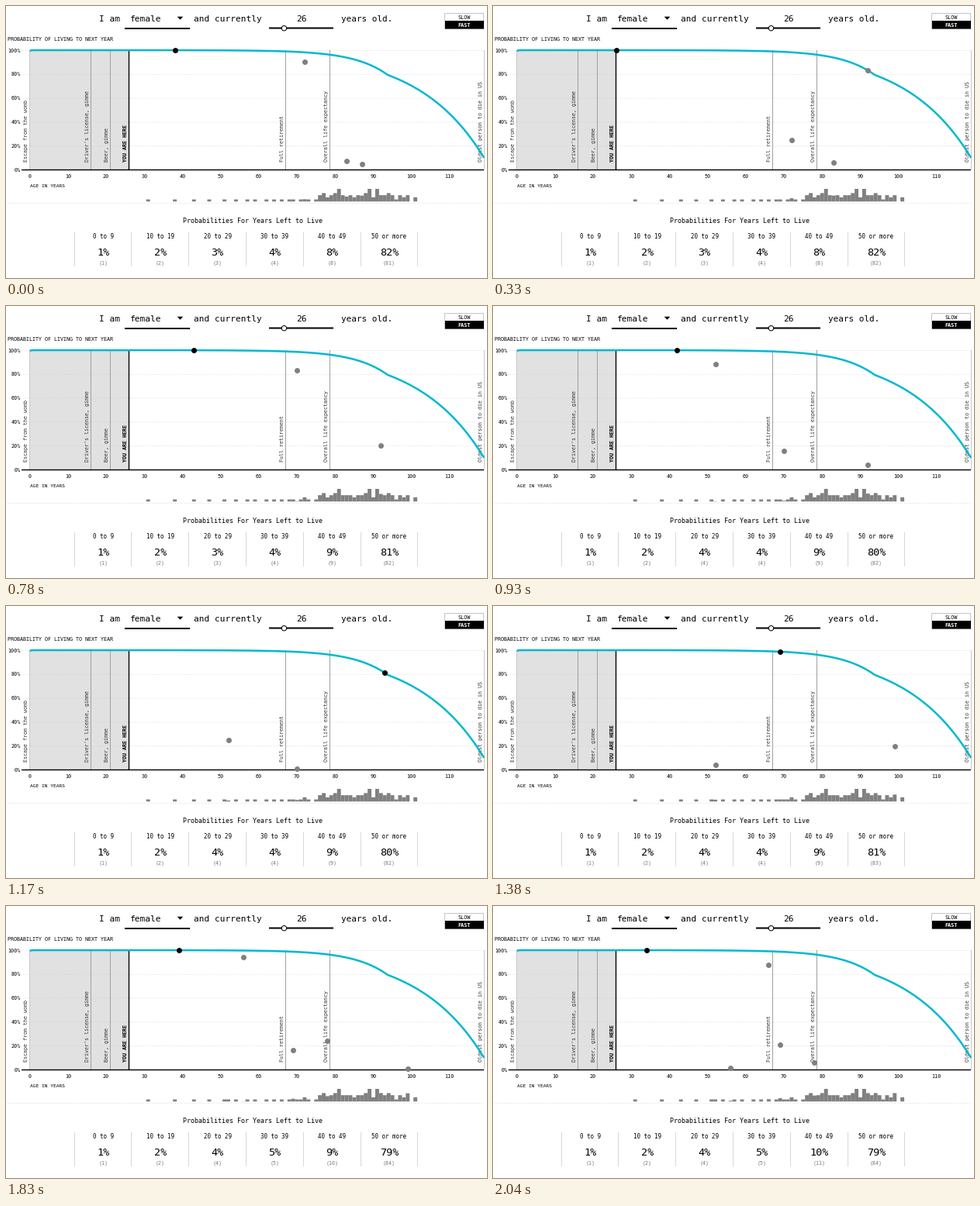
Animation of 620x351 px, one loop 2070 ms. Source, as a matplotlib script:

```python
import numpy as np
import matplotlib
import matplotlib.pyplot as plt
from matplotlib.animation import FuncAnimation
from matplotlib.patches import Circle, Polygon, Rectangle

matplotlib.rcParams["toolbar"] = "None"
matplotlib.rcParams["font.family"] = "DejaVu Sans Mono"
matplotlib.rcParams["path.snap"] = False

W, H, DPI = 620, 351, 100
FRAMES, STEP = 69, 30
PT = 72 / DPI
TOP, FLOOR = 57, 211
START, OLDEST = 26, 119
BLACK, GREY, CYAN = "#000000", "#808080", "#00b8cf"

fig = plt.figure(figsize=(W / DPI, H / DPI), dpi=DPI, facecolor="white")
ax = fig.add_axes([0, 0, 1, 1])
ax.set_xlim(0, W)
ax.set_ylim(H, 0)
ax.axis("off")


def xpos(age):
    return 30.7 + 4.92 * age


def ypos(pct):
    return FLOOR - (FLOOR - TOP) * pct / 100


def label(x, y, s, pitch, color=BLACK, ha="left", **kw):
    """Monospaced text whose characters advance by about `pitch` pixels."""
    return ax.text(x, y, s, fontsize=pitch / 0.602 * PT, color=color, ha=ha,
                   va="baseline", **kw)


def line(xs, ys, color=BLACK, width=1, **kw):
    return ax.plot(xs, ys, color=color, lw=width * PT,
                   solid_capstyle="butt", **kw)[0]


def dotted(x0, x1, y):
    line([x0, x1], [y, y], "#d0d0d0", 0.8, linestyle=(0, (1, 2)), zorder=1.2)


def box(x0, y0, x1, y1, face, edge="none"):
    ax.add_patch(Rectangle((x0, y0), x1 - x0, y1 - y0, facecolor=face,
                           edgecolor=edge, lw=PT, zorder=1))


def curve(age):
    """Height of the survival curve: infancy, then exponential ageing, then +6% a year."""
    age = np.asarray(age, float)
    ageing = np.minimum(0.136 * np.exp(0.112 * (age - 90)), 0.298 * 1.06 ** (age - 100))
    return ypos(100 * (1 - ageing - 0.006 * np.exp(-3 * age)))


def bounce(t):
    if t < 4 / 11:
        return 7.5625 * t * t
    hops = ((6 / 11, 3 / 4), (9 / 11, 15 / 16), (21 / 22, 63 / 64))
    return min(1, *(7.5625 * (t - mid) ** 2 + base for mid, base in hops))


# Header sentence and controls
label(120, 20, "I am", 6.7)
label(160, 20, "female", 6.8)
label(242, 20, "and currently", 6.7)
label(380.5, 20, "26", 6.7, ha="center")
label(431.5, 20, "years old.", 6.65)
line([153, 237], [29, 29], width=2)
ax.add_patch(Polygon([(220.7, 13.7), (228.3, 13.7), (224.5, 17.7)], color=BLACK, lw=0))
line([339, 422], [28.5, 28.5], width=2)
ax.add_patch(Circle((358.5, 28.7), 3.2, facecolor="white", edgecolor=BLACK,
                    lw=PT, zorder=3))
box(565.5, 9.5, 615.5, 29.5, "white", "#c4c4c4")
box(566, 19, 616, 29.5, BLACK)
label(591, 17, "SLOW", 4.1, ha="center")
label(591, 27, "FAST", 4.1, "white", ha="center", weight="bold")

# Chart
label(2.5, 45, "PROBABILITY OF LIVING TO NEXT YEAR", 4)
label(31, 234.5, "AGE IN YEARS", 3.75)
box(31, TOP, xpos(START), FLOOR, "#e1e1e1")
for pct in range(0, 101, 20):
    label(19, ypos(pct) + 2.5, f"{pct}%", 4.1, ha="right")
    if pct:
        dotted(20, 616, ypos(pct) + 0.5)
for age in range(0, 111, 10):
    label(xpos(age), 222, str(age), 4.1, ha="center")
line([20, 616], [211.5, 211.5], width=1.4, zorder=2)

EVENTS = [(0, "Escape from the womb"),
          (16, "Driver's license, gimme"),
          (21, "Beer, gimme"),
          (START, "YOU ARE HERE"),
          (67, "Full retirement"),
          (78.6, "Overall life expectancy"),
          (OLDEST, "Oldest person to die in US")]
for age, text in EVENTS:
    x = np.floor(xpos(age)) + 0.5
    here = age == START
    edge = age in (0, OLDEST)
    line([x, x], [TOP, FLOOR], BLACK if here else "#c8c8c8" if edge else "#a0a0a0",
         1.4 if here else 1, zorder=1.5)
    label(x - 2.5, 201, text, 4, BLACK if here else "#333333",
          weight="bold" if here else "normal",
          rotation=90, rotation_mode="anchor", zorder=2)

ages = np.linspace(0, OLDEST, 480)
line(xpos(ages), curve(ages), CYAN, 2.5, zorder=3)

# Ages at death so far: a few in each early decade, then an old-age cluster
rng = np.random.default_rng(4)
early = [START + 10 * i + 10 * (k + 0.5) / n
         for i, n in enumerate((1, 2, 3, 4, 7)) for k in range(n)]
u = np.linspace(-1, 1, 61)
old = np.concatenate([np.linspace(76, 82, 18), 90.5 + 11 * u * (0.45 + 0.55 * abs(u))])
old = np.clip(old + rng.uniform(-0.8, 0.8, old.size), 76, 103)
BASE = np.bincount(np.concatenate([early, old]).astype(int), minlength=OLDEST + 1)

dotted(2, 616, 254.5)
bars = ax.bar(xpos(np.arange(OLDEST + 1)), 0 * BASE, width=4.92, bottom=252.3,
              color=GREY, lw=0, snap=True)

# Summary table
label(317.5, 280, "Probabilities For Years Left to Live", 5.08, ha="center")
HEADS = ["0 to 9", "10 to 19", "20 to 29", "30 to 39", "40 to 49", "50 or more"]
shares, totals = [], []
for i in range(len(HEADS) + 1):
    x = np.floor(88 + 73.8 * i) + 0.5
    line([x, x], [292, 336], "#d8d8d8")
for i, head in enumerate(HEADS):
    x = 125.2 + 73.75 * i
    label(x, 299.5, head, 4.55, ha="center")
    shares.append(label(x, 322, "", 8.1, ha="center"))
    totals.append(label(x, 333.7, "", 4.0, "#777777", ha="center"))

# Deaths as (clock, age); one clock unit is the time a dropped dot takes to settle
DEATHS = [(-0.78, 87), (-0.35, 83), (-0.105, 72), (0.45, 92), (0.886, 70),
          (1.096, 52), (1.659, 99), (2.035, 78), (2.2475, 69), (2.497, 56),
          (2.742, 66), (3.5, 76)]


def clock(frame):
    return np.interp(frame, [0, 11, 31, 46, 68], [0, 0.455, 1.22, 1.97, 2.865])


def dots(color, z):
    return ax.plot([], [], "o", color=color, ms=7 * PT, mew=0, zorder=z)[0]


fallen, walker = dots(GREY, 5), dots(BLACK, 6)


def update(frame):
    now = clock(frame)
    past = [(now - when, age) for when, age in DEATHS if when <= now]

    # The living dot walks evenly from the start age to its next death
    born = DEATHS[len(past) - 1][0]
    end, last = DEATHS[len(past)]
    age = int(START + (last - START) * (now - born) / (end - born))
    walker.set_data([xpos(age)], [curve(age)])

    falling = [(t, age) for t, age in past if t < 1]
    fallen.set_data([xpos(age) for _, age in falling],
                    [curve(age) + (FLOOR - curve(age)) * bounce(t) for t, age in falling])

    counts, heights = BASE.copy(), BASE.astype(float)
    for t, age in past:
        counts[age] += 1
        heights[age] += min(t, 1)
    for bar, h in zip(bars, heights * 16.3 / heights.max()):
        bar.set_height(-h)

    for i, (share, total) in enumerate(zip(shares, totals)):
        lo = START + 10 * i
        n = counts[lo:lo + 10 if i < 5 else None].sum()
        share.set_text(f"{100 * n / counts.sum():.0f}%")
        total.set_text(f"({n})")
    return [walker, fallen, *bars, *shares, *totals]


anim = FuncAnimation(fig, update, frames=FRAMES, interval=STEP,
                     repeat=True, repeat_delay=0, blit=False)
plt.show()
```
